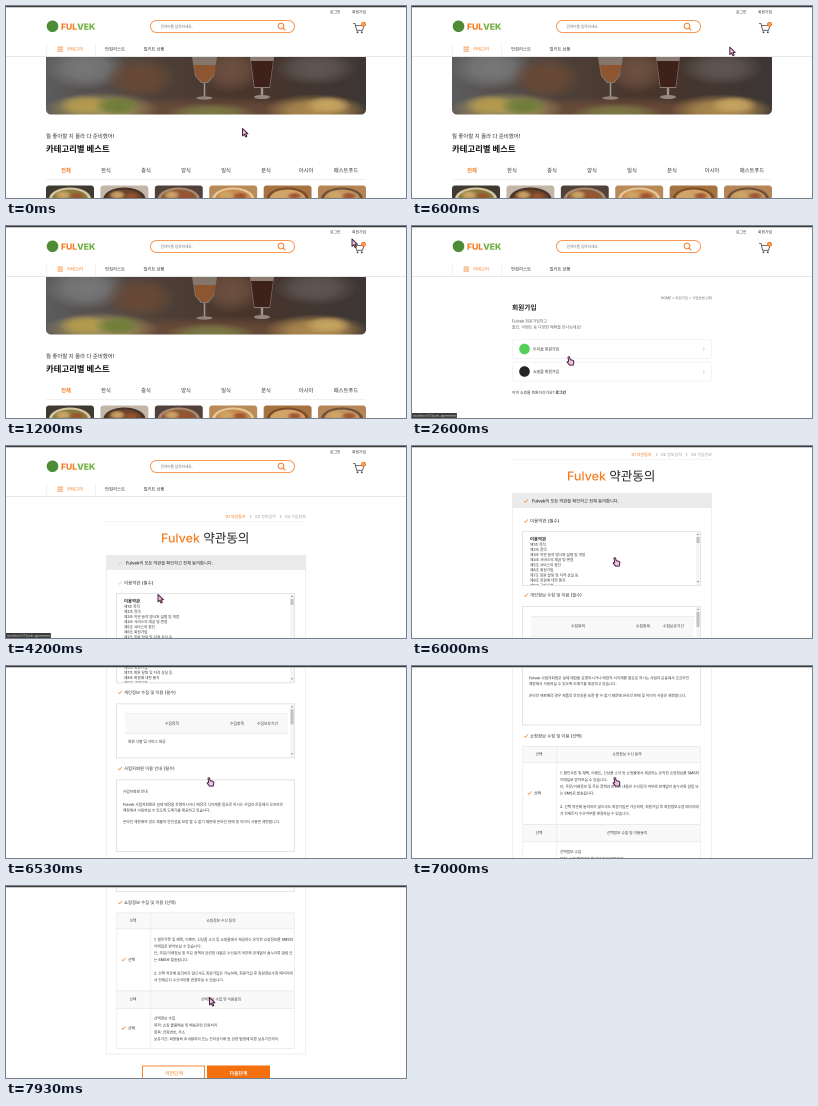
These frames come from a looping animation (400x192 px, 8000 ms). An HTML page with a canvas:

```html
<!DOCTYPE html>
<html lang="ko">
<head>
<meta charset="utf-8">
<title>쇼핑몰 회원가입</title>
<style>
  html, body { margin: 0; width: 100%; height: 100%; overflow: hidden; background: #fff; }
  canvas { display: block; width: 400px; height: 192px; }
</style>
</head>
<body>
<canvas id="stage"></canvas>
<script>
const W = 400, H = 192, LOOP = 8000, FINE = 4;
const ORANGE = '#f57c22', GREEN = '#6fae3c', INK = '#333', GREY = '#777', LINE = '#e6e6e6';
const FONT = 'Inter, "Noto Sans CJK KR", "Noto Sans CJK", "Noto Sans", sans-serif';
const BRAND = 'Fulvek';

// Everything is painted large and scaled down, which keeps tiny text smooth.
const dpr = window.devicePixelRatio || 1;
const canvas = document.getElementById('stage');
canvas.width = W * dpr;
canvas.height = H * dpr;
const screen2d = canvas.getContext('2d');
screen2d.imageSmoothingQuality = 'high';
const buffer = document.createElement('canvas');
buffer.width = W * FINE;
buffer.height = H * FINE;
const ctx = buffer.getContext('2d');

// Drawing helpers; text is placed by its vertical centre.
function text(str, x, y, size, color = INK, weight = 500, align = 'left') {
  ctx.font = `${weight} ${size}px ${FONT}`;
  ctx.textAlign = align;
  ctx.fillStyle = color;
  ctx.fillText(str, x, y + size * 0.36);
  return ctx.measureText(str).width;
}

function rect(x, y, w, h, color) {
  ctx.fillStyle = color;
  ctx.fillRect(x, y, w, h);
}

function frame(x, y, w, h, r, color, width = 1) {
  ctx.beginPath();
  ctx.roundRect(x, y, w, h, r);
  ctx.strokeStyle = color;
  ctx.lineWidth = width;
  ctx.stroke();
}

function oval(x, y, rx, ry, color) {
  ctx.beginPath();
  ctx.ellipse(x, y, rx, ry, 0, 0, Math.PI * 2);
  ctx.fillStyle = color;
  ctx.fill();
}

function path(points, color, width) {
  ctx.beginPath();
  points.forEach(([x, y]) => ctx.lineTo(x, y));
  ctx.strokeStyle = color;
  ctx.lineWidth = width;
  ctx.stroke();
}

function poly(points, color) {
  ctx.beginPath();
  points.forEach(([x, y]) => ctx.lineTo(x, y));
  ctx.closePath();
  ctx.fillStyle = color;
  ctx.fill();
}

function clipped(x, y, w, h, r, draw) {
  ctx.save();
  ctx.beginPath();
  ctx.roundRect(x, y, w, h, r);
  ctx.clip();
  draw();
  ctx.restore();
}

function glow(x, y, rx, ry, color) {
  ctx.save();
  ctx.translate(x, y);
  ctx.scale(rx, ry);
  const soft = ctx.createRadialGradient(0, 0, 0, 0, 0, 1);
  soft.addColorStop(0, color);
  soft.addColorStop(0.5, color + 'cc');
  soft.addColorStop(1, color + '00');
  ctx.fillStyle = soft;
  ctx.fillRect(-1, -1, 2, 2);
  ctx.restore();
}

function header() {
  text('로그인', 324, 6, 3.8);
  text('회원가입', 346, 6, 3.8);

  oval(46.5, 20.3, 5.8, 5.8, '#4d8b35');
  const half = text(BRAND.slice(0, 3).toUpperCase(), 55, 20.6, 8.6, ORANGE, 800);
  text(BRAND.slice(3).toUpperCase(), 55 + half, 20.6, 8.6, GREEN, 800);

  frame(144.5, 14.5, 144, 12, 6, '#f79a58');
  text('검색어를 입력하세요.', 154.5, 20.5, 3.65, GREY);
  ctx.beginPath();
  ctx.arc(275, 20, 2.8, 0, Math.PI * 2);
  ctx.strokeStyle = ORANGE;
  ctx.lineWidth = 1;
  ctx.stroke();
  path([[277, 22], [279.3, 24.3]], ORANGE, 1);

  path([[347, 17.5], [349, 17.5], [350.6, 24.3], [356.5, 24.3], [358, 19.5], [349.5, 19.5]], '#444', 0.8);
  oval(351.5, 26.3, 0.9, 0.9, '#444');
  oval(355.8, 26.3, 0.9, 0.9, '#444');
  oval(357.5, 18.3, 2.5, 2.5, ORANGE);
  text('0', 357.5, 18.3, 3, '#fff', 600, 'center');

  rect(40, 37, 0.6, 13, '#ececec');
  rect(89, 37, 0.6, 13, '#ececec');
  [41, 43, 45].forEach(y => rect(51.5, y - 0.3, 5.5, 0.8, ORANGE));
  text('카테고리', 61, 43, 4.35, ORANGE);
  text('맛집리스트', 99, 43, 4.35);
  text('밀키트 상품', 137.5, 43, 4.3);
  rect(0, 50, W, 0.9, LINE);
}

function heroPhoto() {
  const tone = ctx.createLinearGradient(40, 0, 360, 0);
  tone.addColorStop(0, '#5c5c5e');
  tone.addColorStop(0.35, '#4d4039');
  tone.addColorStop(0.6, '#49352b');
  tone.addColorStop(1, '#3d3736');
  rect(40, 51, 320, 58, tone);
  glow(80, 62, 42, 22, '#78787a');
  glow(135, 72, 36, 22, '#6a4a36');
  glow(225, 64, 30, 24, '#6d5040');
  glow(310, 62, 42, 18, '#605752');
  glow(200, 106, 170, 16, '#6a4c3a');

  glow(95, 103, 58, 17, '#a3955f');
  glow(78, 99, 26, 10, '#b59b4c');
  glow(112, 100, 24, 10, '#6f7d38');
  glow(205, 107, 46, 10, '#7d7a46');
  glow(310, 104, 52, 16, '#b08d50');
  glow(322, 99, 24, 9, '#c7a562');

  poly([[186, 51], [211, 51], [208, 70], [202, 77], [195, 77], [189, 70]], '#84766c');
  poly([[188, 59], [210, 59], [207, 70], [201, 76], [196, 76], [190, 70]], '#8d5530');
  rect(197.7, 77, 1.6, 14, '#9f948b');
  oval(198.5, 92, 8, 1.6, '#91857b');
  poly([[244, 51], [268, 51], [264, 82], [248, 82]], '#8c7e75');
  poly([[245, 55], [267, 55], [263.5, 81], [248.5, 81]], '#3d211a');
  rect(254.8, 82, 2.4, 8, '#9f948b');
  oval(256, 91, 8, 2, '#94887f');
}

function foodPhoto(i) {
  const x = 40 + i * 54.4;
  const backs = ['#3f3b30', '#c4b6a6', '#50423a', '#b98a58', '#a5733f', '#b58556'];
  const rims = ['#d5c6a6', '#46332a', '#a98a70', '#e3c79b', '#7a4c2a', '#6e5038'];
  const foods = ['#8a7a3c', '#6b4429', '#8d5a38', '#c98a4c', '#d3a066', '#c39460'];
  clipped(x, 179.5, 48, 24, 3, () => {
    rect(x, 179, 48, 24, backs[i]);
    oval(x + 24, 193, 21, 11.5, rims[i]);
    oval(x + 24, 193, 18, 9.5, foods[i]);
    glow(x + 17, 189, 9, 5, '#d0a768');
    glow(x + 31, 190, 8, 4, '#9c5230');
  });
}

function homePage() {
  header();
  clipped(40, 51, 320, 57.5, [0, 0, 5, 5], heroPhoto);
  text('뭘 좋아할 지 몰라 다 준비했어!', 40, 130, 5.4);
  text('카테고리별 베스트', 40, 143, 8.4, '#111', 700);
  ['전체', '한식', '중식', '양식', '일식', '분식', '아시아', '패스트푸드'].forEach((name, i) =>
    text(name, 60 + i * 40, 164.3, 5.3, i ? INK : ORANGE, i ? 400 : 700, 'center'));
  rect(40, 173, 320, 0.7, '#ececec');
  for (let i = 0; i < 6; i++) foodPhoto(i);
}

function joinPage() {
  header();
  text('HOME > 회원가입 > 가입방법 선택', 300, 72, 3.45, GREY, 500, 'right');
  text('회원가입', 100, 81.5, 6.7, '#222', 600);
  text(BRAND + ' 회원가입하고', 100, 95, 3.95, '#666');
  text('할인, 이벤트 등 다양한 혜택을 만나보세요!', 100, 101, 3.95, '#666');
  [['두리솔 회원가입', 123, '#52d25c'], ['쇼핑몰 회원가입', 145.5, '#252525']].forEach(([label, y, color]) => {
    frame(100.5, y - 9.5, 199, 19, 3, '#f0f0f0', 0.8);
    oval(112.5, y, 5.3, 5.3, color);
    text(label, 121, y, 3.9);
    path([[291, y - 1.5], [292.5, y], [291, y + 1.5]], '#bbb', 0.5);
  });
  const ask = text('이미 쇼핑몰 회원이신가요? ', 100, 166.5, 3.8);
  text('로그인', 100 + ask, 166.5, 3.8, '#222', 600);
}

function check(x, y, on) {
  path([[x - 1.8, y], [x - 0.5, y + 1.4], [x + 2, y - 1.6]], on ? '#f0954a' : '#d8d8d8', 0.8);
}

function scrollBox(y, h, thumb) {
  frame(110.5, y + 0.5, 178, h, 0, '#dedede', 0.8);
  rect(284, y + 1, 4, h - 1, '#f5f5f5');
  rect(284.5, y + 6, 3, thumb, '#c2c2c2');
  poly([[285, y + 4], [287, y + 4], [286, y + 2.5]], '#777');
  poly([[285, y + h - 4], [287, y + h - 4], [286, y + h - 2.5]], '#777');
}

function lines(list, x, y, gap) {
  list.forEach((line, i) => text(line, x, y + i * gap, 3.67, '#3c3c3c'));
}

function tableHead(y, h, title) {
  rect(111, y, 177, h, '#f9f9f9');
  rect(111, y, 177, 0.7, LINE);
  rect(111, y + h, 177, 0.7, LINE);
  text('선택', 127, y + h / 2, 3.7, '#3c3c3c', 500, 'center');
  text(title, 215, y + h / 2, 3.7, '#3c3c3c', 500, 'center');
}

function choice(y, on) {
  check(117.5, y, on);
  text('선택', 122, y, 3.9);
}

function termsBox(on) {
  check(114, 137, on);
  text('이용약관 (필수)', 118, 137, 4.5);
  scrollBox(147, 54, 6);
  clipped(111, 148, 173, 53, 0, () => {
    text('이용약관', 118, 155, 4.35, '#222', 700);
    lines(['제1조 목적', '제2조 정의', '제3조 약관 등의 명시와 설명 및 개정', '제4조 서비스의 제공 및 변경',
      '제5조 서비스의 중단', '제6조 회원가입', '제7조 회원 탈퇴 및 자격 상실 등', '제8조 회원에 대한 통지',
      '제9조 구매신청'], 118, 160.4, 5.12);
  });
}

function privacyBox(on) {
  check(114, 211, on);
  text('개인정보 수집 및 이용 (필수)', 118, 211, 4.35);
  scrollBox(222, 54, 15);
  rect(119, 232, 163, 20, '#f8f8f8');
  rect(119, 232, 163, 0.6, LINE);
  rect(119, 252, 163, 0.6, LINE);
  [['수집목적', 166], ['수집항목', 231], ['수집보유기간', 261.5]].forEach(([name, x]) =>
    text(name, x, 242, 3.8, '#3c3c3c', 500, 'center'));
  lines(['회원 식별 및 서비스 제공'], 122, 260, 6);
}

function businessBox(on) {
  check(114, 287, on);
  text('사업자회원 이용 안내 (필수)', 118, 287, 4.35);
  frame(110.5, 298.5, 178, 71.5, 0, '#dedede', 0.8);
  lines(['사업자회원 안내'], 117, 310, 6);
  lines([BRAND + ' 사업자회원은 실제 매장을 운영하시거나 매장의 식자재를 필요로 하시는 사업과 운동에서 오프라인',
    '매장에서 사용하실 수 있도록 도매가를 제공하고 있습니다.', '',
    '온라인 재판매의 경우 제품의 안전성을 보장 할 수 없기 때문에 온라인 판매 및 이미지 사용은 제한합니다.'],
    117, 323, 5.8);
}

function shoppingTable(on) {
  check(114, 381, on);
  text('쇼핑정보 수집 및 이용 (선택)', 118, 381, 4.35);
  tableHead(391, 16, '쇼핑정보 수신 동의');
  choice(438, on);
  lines(['1. 할인쿠폰 및 혜택, 이벤트, 신상품 소식 등 쇼핑몰에서 제공하는 유익한 쇼핑정보를 SMS와',
    '이메일로 받아보실 수 있습니다.',
    '단, 주문/거래정보 및 주요 정책과 관련된 내용은 수신동의 여부와 관계없이 솔누리톡 알림 또',
    '는 SMS로 발송됩니다.', '',
    '2. 선택 약관에 동의하지 않으셔도 회원가입은 가능하며, 회원가입 후 회원정보수정 페이지에',
    '서 언제든지 수신여부를 변경하실 수 있습니다.'], 148, 418, 6.75);
  tableHead(469, 17.5, '선택정보 수집 및 이용동의');
  choice(506.5, on);
  lines(['선택정보 수집', '목적: 쇼핑 물품배송 및 배송관련 민원처리', '항목: 전화번호, 주소',
    '보유기간: 회원탈퇴 후 6월까지 또는 전자상거래 등 관련 법령에 따른 보유기간까지'], 148, 496.8, 6.9);
  rect(111, 526.5, 177, 0.7, LINE);
  [110.5, 144.5, 288].forEach(x => rect(x, 391, 0.6, 136, LINE));
}

function agreementPage(scroll, on) {
  ctx.save();
  ctx.translate(0, -scroll);
  header();
  [['01 약관동의', 219.5, ORANGE], ['02 정보입력', 249, '#aaa'], ['03 가입완료', 279, '#aaa']].forEach(([name, x, color], i) => {
    text(name, x, 70.5, 4, color);
    if (i) path([[x - 5, 69.2], [x - 3.8, 70.5], [x - 5, 71.8]], '#aaa', 0.6);
  });
  rect(100, 75.5, 200, 0.6, '#ececec');
  const name = text(BRAND, 155, 92, 12.5, ORANGE);
  text(' 약관동의', 155 + name, 92, 12.5, '#222');

  rect(100, 109, 200, 15, '#ebebeb');
  check(114, 117, on);
  text(BRAND + '의 모든 약관을 확인하고 전체 동의합니다.', 120, 117, 4.28, '#222');
  frame(100.5, 109.5, 199, 423, 0, '#ebebeb', 0.8);

  termsBox(on);
  privacyBox(on);
  businessBox(on);
  shoppingTable(on);

  frame(136.5, 544.5, 62, 16, 0, ORANGE, 0.9);
  text('이전단계', 168, 551.8, 4.85, ORANGE, 500, 'center');
  rect(201, 544, 63, 17, '#f4700f');
  text('다음단계', 232.5, 551.8, 4.85, '#fff', 600, 'center');
  ctx.restore();
}

function statusBar(address) {
  ctx.font = `400 3px ${FONT}`;
  rect(0, 187, ctx.measureText(address).width + 2, 5, '#3b3b3b');
  text(address, 1, 189.6, 3, '#ddd', 400);
}

const ARROW = new Path2D('M0 0L0 7.4L1.8 5.8L3 8.5L4.3 7.9L3.1 5.3L5.4 5.2Z');
const HAND = new Path2D('M1 0.6Q1.9 -0.2 2.6 0.7L3.2 3.2L5.6 3.7Q7 4.1 6.8 5.6L6.3 8.6L2.6 8.6L0.2 5.8Q0.2 4.7 1.7 5.1Z');

function pointer([x, y], hand) {
  const shape = hand ? HAND : ARROW;
  ctx.save();
  ctx.translate(x, y);
  ctx.lineJoin = 'round';
  ctx.fillStyle = '#e8c4df';
  ctx.fill(shape);
  ctx.strokeStyle = '#4e2348';
  ctx.lineWidth = 1;
  ctx.stroke(shape);
  ctx.restore();
}

// Keys are [time, ...values]; each span is eased in and out.
function track(keys, t) {
  let i = 0;
  while (i < keys.length - 2 && t >= keys[i + 1][0]) i++;
  const [t0, ...a] = keys[i], [t1, ...b] = keys[i + 1];
  const u = Math.min(1, Math.max(0, (t - t0) / (t1 - t0)));
  const e = u * u * (3 - 2 * u);
  return a.map((v, k) => v + (b[k] - v) * e);
}

const MOVES = [[0, 236.5, 122.5], [100, 236.5, 122.5], [850, 346, 13], [1220, 346, 13], [1360, 351, 7],
  [1750, 351, 7], [2450, 155, 130.5], [2650, 155, 130.5], [3000, 152, 148.5], [4420, 152, 148.5],
  [4720, 113, 116], [4880, 113, 116], [5230, 201, 111.5], [7100, 201, 111.5], [7600, 203.5, 111.5]];
const SCROLL = [[5300, 0], [5880, 62], [6130, 62], [6940, 311], [7060, 311], [7780, 364.5]];
const HANDS = [[1300, 1500], [2350, 3480], [4680, 7100]];

function draw(t) {
  ctx.setTransform(FINE, 0, 0, FINE, 0, 0);
  rect(0, 0, W, H, '#fff');
  if (t < 1480) homePage();
  else if (t < 3480) joinPage();
  else agreementPage(track(SCROLL, t)[0], t >= 4800);

  if (t >= 1320 && t < 1800) statusBar('localhost:5173/join');
  if (t >= 2380 && t < 4480) statusBar('localhost:5173/join_agreement');
  rect(0, 0, W, 1, '#3c3c3c');
  rect(0, 1, W, 0.6, '#a8a8a8');
  pointer(track(MOVES, t), HANDS.some(([from, to]) => t >= from && t < to));
  screen2d.drawImage(buffer, 0, 0, canvas.width, canvas.height);
}

const start = performance.now();
function tick() {
  draw((performance.now() - start) % LOOP);
  requestAnimationFrame(tick);
}
draw(0);
requestAnimationFrame(tick);
</script>
</body>
</html>
```
